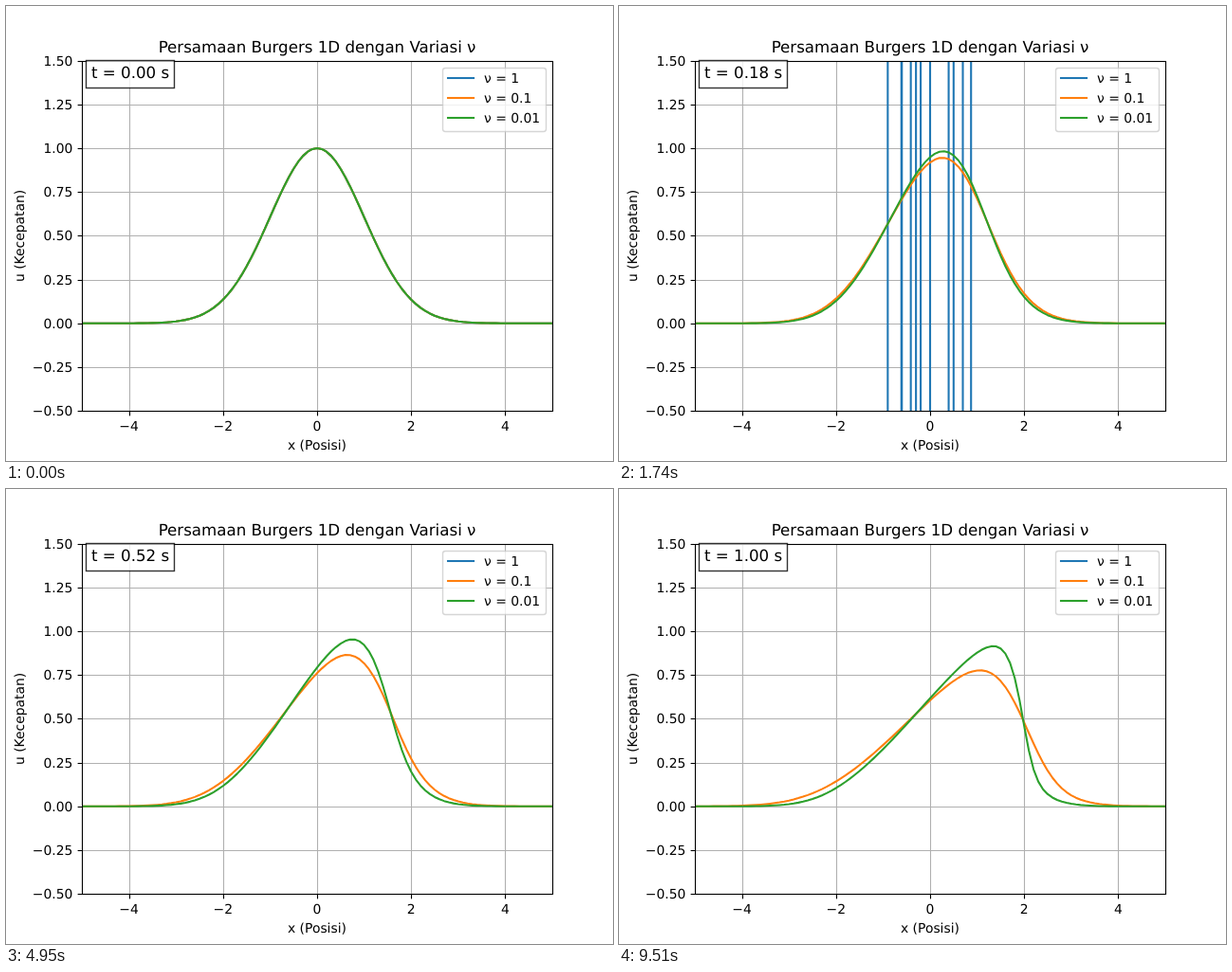
An HTML page for the animation above (9540 ms loop, 640 by 480 pixels).

```html
<!DOCTYPE html>
<html lang="id">
<head>
<meta charset="utf-8">
<title>Persamaan Burgers 1D</title>
<style>
  html, body { margin: 0; width: 100%; height: 100%; overflow: hidden; background: #fff; }
  svg { display: block; width: 640px; height: 480px; }
  text { font-family: "DejaVu Sans", sans-serif; font-size: 13.889px; text-rendering: geometricPrecision; }
  .large { font-size: 16.667px; }
  .mid { text-anchor: middle; }
  .end { text-anchor: end; }
  .curve { fill: none; stroke-width: 2.083; stroke-linejoin: round; stroke-linecap: square; }
  .grid { stroke: #b0b0b0; stroke-width: 1.111; }
  .axis { stroke: #000; stroke-width: 1.111; fill: none; }
</style>
</head>
<body>
<svg id="stage" viewBox="0 0 640 480" xmlns="http://www.w3.org/2000/svg">
  <clipPath id="plot"><rect x="80" y="58" width="497" height="370"/></clipPath>
  <g id="grid"></g>
  <g id="curves" clip-path="url(#plot)"></g>
  <g id="ticks"></g>
  <rect class="axis" x="80.5" y="58.5" width="496" height="369"/>
  <text class="large mid" x="328" y="49">Persamaan Burgers 1D dengan Variasi ν</text>
  <text class="mid" x="328" y="468">x (Posisi)</text>
  <text class="mid" transform="translate(19 242.4) rotate(-90)">u (Kecepatan)</text>
  <rect x="84.5" y="57.5" width="93" height="29" fill="#fff" stroke="#000" stroke-width="1.389" opacity="0.8"/>
  <text id="clock" class="large" x="90" y="76"></text>
  <g id="legend">
    <rect x="460.5" y="65.5" width="109" height="67" rx="2.78" fill="#fff" stroke="#ccc" stroke-width="1.389" opacity="0.8"/>
  </g>
</svg>
<script>
const STEP_MS = 30, STEPS = 318;
const POINTS = 101;
const dx = 2 * Math.PI / (POINTS - 1);
const dt = dx * 0.05;
const series = [
  { nu: 1, color: "#1f77b4" },
  { nu: 0.1, color: "#ff7f0e" },
  { nu: 0.01, color: "#2ca02c" }
];

const byId = id => document.getElementById(id);
const toX = x => 328 + 49.6 * x;
const toY = u => 334.8 - 184.8 * u;
const snap = v => Math.floor(v + 0.5) + 0.5;

function add(parent, tag, attrs, text = "") {
  const node = document.createElementNS("http://www.w3.org/2000/svg", tag);
  for (const key in attrs) node.setAttribute(key, attrs[key]);
  node.textContent = text;
  return byId(parent).appendChild(node);
}

const line = (parent, cls, x1, y1, x2, y2) =>
  add(parent, "line", { class: cls, x1, y1, x2, y2 });
const signed = (v, digits) => v.toFixed(digits).replace("-", "\u2212");

// Correctly rounded exp(-z): the unstable case amplifies even rounding errors.
function expNeg(z) {
  const scaled = BigInt(Math.round(z * 2 ** 60));
  let term = 1n << 120n, sum = term;
  for (let k = 1n; k < 90n; k++) {
    term = -term * scaled / (k << 60n);
    sum += term;
  }
  return Number(sum) / 2 ** 120;
}

const xs = Array.from({ length: POINTS }, (_, i) => i * 0.1 - 5);
const initial = xs.map(x => expNeg(x * x / 2));

// Upwind convection, central diffusion, periodic ends.
function advance(u, nu) {
  const last = POINTS - 1;
  const next = u.map((c, i) => {
    const left = u[i === 0 ? last - 1 : i - 1];
    const right = u[i === last ? 1 : i + 1];
    return c - c * dt / dx * (c - left) + nu * dt / (dx * dx) * (right - 2 * c + left);
  });
  next[last] = next[0];
  return next;
}

function clipEnd(a, b) {
  const bound = Math.max(-20, Math.min(500, a.y));
  if (bound === a.y) return a;
  return { x: a.x + (b.x - a.x) * ((bound - a.y) / (b.y - a.y)), y: bound };
}

function toPath(u) {
  const pts = u.map((v, i) => ({ x: toX(xs[i]), y: toY(v) }));
  const show = p => p.x.toFixed(2) + " " + p.y.toFixed(2);
  let path = "", joined = false;
  for (let i = 1; i < pts.length; i++) {
    const a = pts[i - 1], b = pts[i];
    const hidden = !isFinite(a.y) || !isFinite(b.y) ||
      Math.max(a.y, b.y) < -20 || Math.min(a.y, b.y) > 500;
    if (hidden) { joined = false; continue; }
    const start = clipEnd(a, b), end = clipEnd(b, a);
    if (!joined || start !== a) path += "M" + show(start);
    path += "L" + show(end);
    joined = end === b;
  }
  return path;
}

for (let x = -4; x <= 4; x += 2) {
  const px = snap(toX(x));
  line("grid", "grid", px, 58, px, 427);
  line("ticks", "axis", px, 427.5, px, 432.4);
  add("ticks", "text", { class: "mid", x: toX(x), y: 448 }, signed(x, 0));
}
for (let u = -0.5; u <= 1.5; u += 0.25) {
  const py = snap(toY(u));
  line("grid", "grid", 80, py, 576, py);
  line("ticks", "axis", 75.6, py, 80.5, py);
  add("ticks", "text", { class: "end", x: 70.3, y: py + 4.5 }, signed(u, 2));
}

series.forEach((s, row) => {
  const y = 76 + 21 * row;
  s.node = add("curves", "path", { class: "curve", stroke: s.color });
  add("legend", "path", { class: "curve", stroke: s.color, d: `M466 ${y}H493` });
  add("legend", "text", { x: 504, y: y + 5 }, "ν = " + s.nu);
  s.paths = [];
  for (let n = 0, u = initial; n < STEPS; n++, u = advance(u, s.nu)) s.paths.push(toPath(u));
});

let shown = -1;
function draw(ms) {
  const step = Math.floor(ms / STEP_MS) % STEPS;
  if (step === shown) return;
  shown = step;
  for (const s of series) s.node.setAttribute("d", s.paths[step]);
  byId("clock").textContent = `t = ${(step * dt).toFixed(2)} s`;
}

const begin = performance.now();
function tick() {
  draw(performance.now() - begin);
  requestAnimationFrame(tick);
}
draw(0);
requestAnimationFrame(tick);
</script>
</body>
</html>
```
